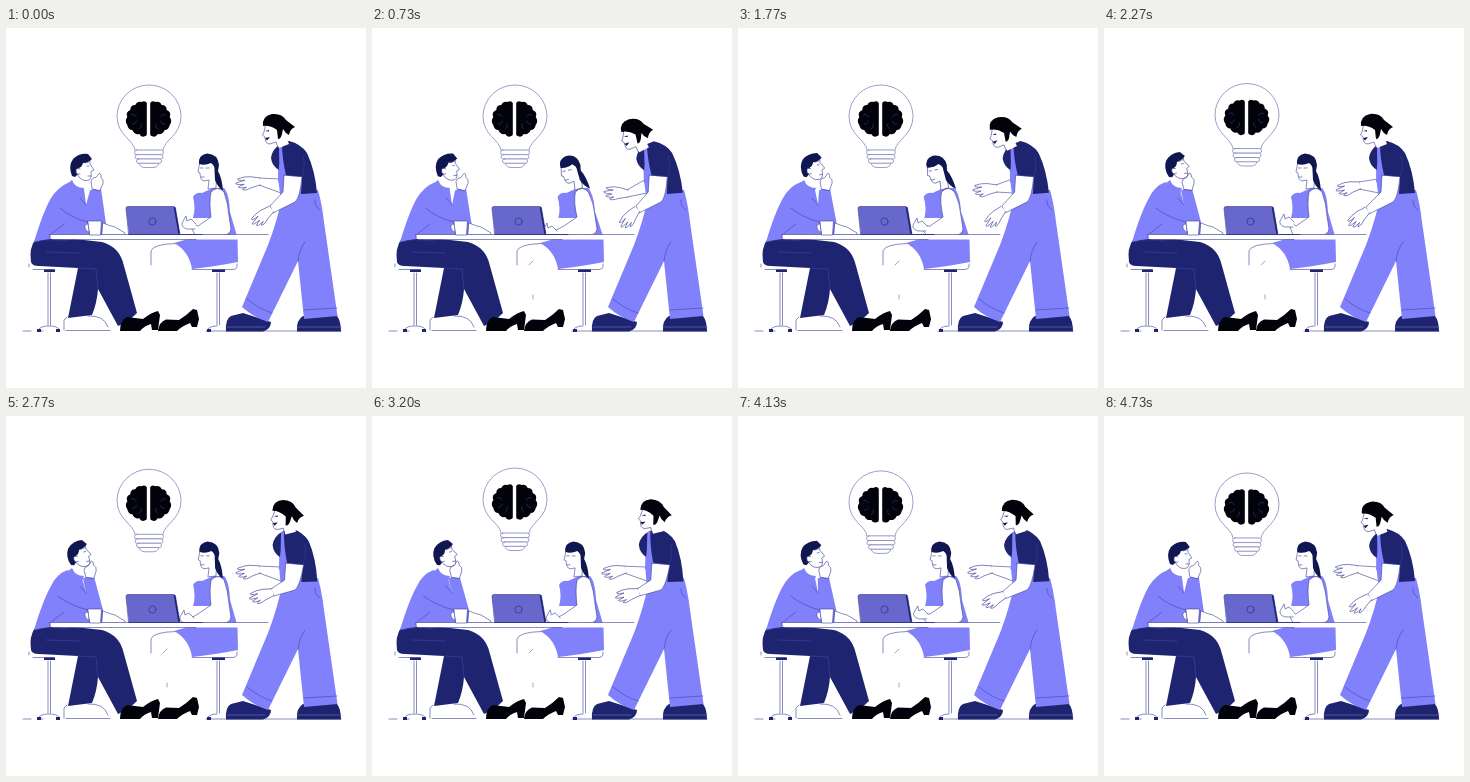
These frames come from a looping animation (360x360 px, 4800 ms). An HTML page:

```html
<!DOCTYPE html>
<html lang="en">
<head>
<meta charset="utf-8">
<title>Team brainstorm</title>
<style>
html, body { margin: 0; width: 100%; height: 100%; overflow: hidden; background: #fff; }
svg { display: block; width: 100vw; height: 100vh; }
path, circle, rect { stroke-linejoin: round; stroke-linecap: round; }
.line { fill: none; stroke: #3b3d92; stroke-width: .6; }
.skin { fill: #fff; stroke: #3b3d92; stroke-width: .6; }
.plain { fill: #fff; }
.glass { fill: #fff; stroke: #8587bd; stroke-width: .8; }
.violet { fill: #8181fb; }
.navy { fill: #1e246f; }
.hair { fill: #10164f; }
.black { fill: #02020a; }
.fold { fill: none; stroke: #4446b0; stroke-width: .6; }
</style>
</head>
<body>
<svg viewBox="0 0 360 360">
  <defs>
    <g id="half">
      <path class="black" d="M-1.5-16Q-3-19-7-17Q-11-18-13-14Q-18-14-18-9Q-23-7-21-2Q-24 2-21 6Q-20 11-16 11Q-14 16-9 15Q-7 19-3 17Q-1.500 17-1.500 15Z"/>
      <path class="line" d="M-17-4Q-14-6-12-2M-16 5Q-13 6-12 2M-9 10Q-6 8-7 5"/>
    </g>
    <path id="hand" class="skin" d="M1-4L-8-6Q-14-7-21-5Q-22-3-14-3L-23-1Q-25 1-15 1L-21 3Q-21 5-13 4L-17 6Q-15 8-8 5L1 3"/>
  </defs>

  <g id="bulb">
    <path class="glass" d="M129 122C128 112 111 107 111 88.500A32 31.500 0 0 1 175 88.500C175 107 158 112 157 122Z"/>
    <path class="glass" d="M133 135H153Q152 139.500 147 139.500H139Q134 139.500 133 135Z"/>
    <rect class="glass" x="128.500" y="122" width="29" height="4.600" rx="2.300"/>
    <rect class="glass" x="129" y="126.600" width="28" height="4.400" rx="2.200"/>
    <rect class="glass" x="130.500" y="131" width="25" height="4.200" rx="2.100"/>
    <use href="#half" x="142.300" y="91"/>
    <use href="#half" transform="translate(142.700 91) scale(-1 1)"/>
  </g>

  <path class="line" d="M17 303H25M32 303H37M200 303H335"/>
  <g id="stools">
    <path class="line" d="M23 236V239M27 241.500H48M42 245V297M44.500 245V297M33 301Q35 298 43 298T53 301"/>
    <path class="line" d="M231 236V239Q230 241.500 227 241.500H186M211 245V297M213.500 245V297M202 301Q204 298 211 298"/>
    <path class="navy" d="M38 241.500H49V244H38ZM206 241.500H219V244H206ZM31 301H35V304H31ZM50 301H54V304H50ZM201 301H205V304H201Z"/>
  </g>

  <!-- seated woman -->
  <path class="line" d="M145 237V223Q147 216 170 215.500"/>
  <path id="specks" class="line" d="M157 237L161 233M161 267V271"/>
  <path class="violet" d="M168 215L182 211H231.500L232 234Q206 239 186 241Q183 223 168 215Z"/>
  <g id="herTorso">
    <path class="plain" d="M201 149V160Q206 165 211 161V149Z"/>
    <path class="violet" d="M187 169Q190 164 196 165L207 160L218 160Q223 165 224 184L231 208H218L205 190H187Q190 180 187 169Z"/>
  </g>
  <g id="herHead">
    <path class="skin" d="M194 133Q193 139 192 144L194 145Q194 152 198 153L203 152L202 161L210 160L211 138L204 131Z"/>
    <path class="hair" d="M193 136Q192 127 201 125.500Q212 126 213 137L212 143Q216 150 217 163Q211 158 209 152L208.500 142Q209 138 205 135Q199 138 193 136Z"/>
    <path class="line" d="M194.500 140H197M200 140H203M195 149H198"/>
  </g>
  <path id="herArm" class="skin"/>
  <path id="herHand" class="skin" d="M8 5L0 5Q-6 3-5-1L-1-8L0-3L4-5L9 0"/>

  <!-- seated man -->
  <path class="line" d="M61 289L58 292V302M60 302.500H104M82 288Q98 287 102 299"/>
  <path class="navy" d="M29 212Q23 220 25 234Q26 238 33 238L72 240L62 290L86 287Q91 275 92 261L112 298Q122 294 131 285L118 238Q114 219 96 214L60 210Z"/>
  <path class="fold" d="M72 240L90 241L92 261M40 224L73 225"/>
  <path id="hisBody" class="violet"/>
  <g id="hisHead">
    <path class="plain" d="M67 146L66 156Q73 163 79 159L78 152Z"/>
    <path class="skin" d="M72 133L84 130L84 136L88 142L85 143.500Q86 150 83 152Q77 154 73 149L69 143Z"/>
    <path class="hair" d="M66 148Q62 138 67 131Q73 125 82 126L86 131Q82 135 77 135Q76 139 73 140V145L69 149Z"/>
    <path class="skin" d="M74 141Q70 139 70 143T74 146"/>
    <path class="line" d="M79 135L83 134M81 138H83M82 148H85"/>
  </g>
  <path class="violet" d="M61 156L66 152Q69 160 78 160L76 165Q66 164 61 156Z"/>
  <path id="hisArm" class="violet"/>
  <path id="hisHand" class="skin" d="M-5 7L-6 0Q-5-4-1-4L2-8Q4-9 4-4Q7-2 6 2L3 9Z"/>
  <path id="hisFold" class="fold"/>
  <path class="skin" d="M97 195Q104 198 109 199L119 205V207H96Z"/>

  <!-- table -->
  <path class="plain" d="M44 206.500H261Q262 211 255 211.500H47Q44 211 44 206.500Z"/>
  <path class="line" d="M44 206.500H262M46 211.500H190M44 206.500V210"/>
  <path class="line" d="M31 214Q38 210 62 213"/>
  <path class="skin" d="M82 193H95.500L94.500 207H84ZM82 196Q78 196 79 200T83 204"/>
  <path d="M120 180Q120 178.500 122 178.500H167Q169 178.500 169.500 180L174 206.500H123Z" fill="#6868cc" stroke="#34368f" stroke-width=".6"/>
  <path d="M168.500 179.500L173 205.500" stroke="#1e246f" stroke-width="1.500"/>
  <circle cx="146.500" cy="193.500" r="3.600" fill="none" stroke="#34368f" stroke-width=".8"/>
  <path d="M123 206.500H196" stroke="#34368f"/>

  <!-- heeled shoes -->
  <path class="black" d="M114 303Q114 292 121 289L137 291Q146 284 152 283L154 287L152 302H146L145 296Q138 298 134 303Z"/>
  <path class="black" d="M152 303Q153 294 160 291.500L173 292Q181 287 187 281L191 282L193 291L191 299H186L184 295Q176 298 171 303Z"/>

  <!-- presenter -->
  <path id="farArm" class="skin"/>
  <use id="farHand" href="#hand"/>
  <path class="navy" d="M220 303.500Q219 291 225 288L237 285L265 294Q265 301 257 303.500ZM291 303.500Q290 292 297 288H331Q335 293 335 303.500Z"/>
  <path d="M221 299H259M291 299H335" stroke="#7f84c4" stroke-width=".5"/>
  <path class="violet" d="M278 162H312Q316 176 318 194L331.500 288L298 291L292 233L262 294Q247 289 236 279L262 217Q271 194 278 162Z"/>
  <path class="fold" d="M241 271Q253 281 266 285M298 282L331 280M292 233Q293 222 299 214M309 171Q308 178 314 182"/>
  <g id="torso">
    <path class="plain" d="M271 108L275 122L284 120L282 108Z"/>
    <path class="violet" d="M272 138L296 150L311 163L313 171L276 176Q272 158 272 138Z"/>
    <path class="navy" d="M275 116L283 113Q295 116 301 125Q309 142 311 165L295 166L296 149L278 147L273 142Q266 138 265 130Q266 121 275 116Z"/>
    <path class="violet" d="M273 117L276 116Q276 130 280 147L276 156L272 154Q274 135 273 117Z"/>
    <path class="line" d="M297 128Q300 138 296 149"/>
  </g>
  <path id="nearArm" class="skin"/>
  <use id="nearHand" href="#hand"/>
  <g id="head">
    <path class="plain" d="M260 94L258 104L256.500 108L259 109Q259 116 264 116L270 114L273 120L283 116L278 104L276 94Z"/>
    <path class="line" d="M260 95L258 104L256.500 107L259 109Q259 116 264 116L270 114L272 120"/>
    <path class="black" d="M257 98Q256 88 266 86Q276 85 280 92L289 99Q284 101 283 107Q279 105 277 101L276 106Q275 111 272 111L271 102Q264 97 257 98Z"/>
    <path class="hair" d="M259 103L263 102L263 103.500ZM259 110L264 109L261 112.500Z"/>
  </g>
</svg>

<script>
const LOOP = 4800;
const $ = id => document.getElementById(id);
const set = (id, name, value) => $(id).setAttribute(name, value);
const move = (id, value) => set(id, 'transform', value);
const times = [0, 730, 1770, 2270, 2770, 3670];
const N = times.length;

const knot = i => times[(i + N) % N] + LOOP * Math.floor(i / N);

// Smooth looping curve through one value per listed time.
function pose(t, ...v) {
  const at = i => v[(i + N) % N];
  const slope = i => (at(i + 1) - at(i - 1)) / (knot(i + 1) - knot(i - 1));
  let i = 0;
  while (i < N - 1 && t >= times[i + 1]) i++;
  const h = knot(i + 1) - knot(i), k = (t - knot(i)) / h;
  const e = k * k * (3 - 2 * k);
  return at(i) + (at(i + 1) - at(i)) * e
    + h * k * (1 - k) * (slope(i) * (1 - k) - slope(i + 1) * k);
}

function ease(t, from, to) {
  const k = Math.min(1, Math.max(0, (t - from) / (to - from)));
  return k * k * (3 - 2 * k);
}

function place(id, x, y, turn, px = 0, py = 0) {
  move(id, `translate(${x} ${y}) rotate(${turn} ${px} ${py})`);
}

function drawMan(t) {
  const tilt = pose(t, 0, -2, -6, -12.5, -12.5, -11);
  const hx = pose(t, 91, 90, 88, 84, 84, 84);
  const hy = 153.5;
  const lean = tilt / 5;
  move('hisHead', `rotate(${tilt} 70 153)`);
  set('hisBody', 'd', `M${64 + lean} 154Q${53 + lean} 158 45 170Q37 184 28 214Q50 208 82 208H98L80 176L${78 + lean} 161Q70 162 ${64 + lean} 154Z`);
  set('hisArm', 'd', `M${hx - 7} ${hy + 9}L80 177L82 194L97 206Q101 202 ${100 + lean} 196L${hx + 4} ${hy + 7}Q${hx - 2} ${hy + 6} ${hx - 7} ${hy + 9}Z`);
  set('hisFold', 'd', `M80 177L74 170M${54 + lean} 180Q65 190 82 194M44 207L58 196`);
  place('hisHand', hx, hy, tilt / 2);
}

function drawSeated(t) {
  const turn = pose(t, 0, -13, -12, 0, 1, 0);
  const x = pose(t, 181, 176, 180, 181, 179, 180);
  const y = pose(t, 196, 203, 198, 194, 202, 200);
  const s = turn / 8;
  move('herHead', `rotate(${turn} 208 157)`);
  move('herTorso', `translate(0 207) skewX(${-turn / 6}) translate(0 -207)`);
  set('herArm', 'd', `M${x + 6} ${y}L192 198L205 189Q${203 + s} 174 ${205 + s} 164Q${212 + s} 157 ${218 + s} 164Q222 175 223 188L225 201Q224 207 217 207H189L${x + 5} ${y + 5}Z`);
  place('herHand', x, y, 0);
}

function drawPresenter(t) {
  const lean = pose(t, 0, -1, -.5, 0, 2, 2);
  const fx = pose(t, 253, 255, 258, 255, 253, 253);
  const fy = pose(t, 154, 166, 161, 158, 154, 155);
  const nx = pose(t, 265, 265, 265, 263, 266, 266);
  const ny = pose(t, 182, 182, 182, 183, 177, 178);
  const s = lean * .8;
  move('torso', `rotate(${lean} 296 175)`);
  place('farHand', fx, fy, pose(t, -5, 4, -4, -12, -9, -9));
  set('farArm', 'd', `M274 151L${fx} ${fy - 4}V${fy + 3}L275 165Z`);
  place('nearHand', nx, ny, pose(t, -38, -48, -45, -40, -15, -17));
  set('nearArm', 'd', `M${278 + s} 147.500L${277 + s} 164L${nx - 1} ${ny - 4}L${nx + 2} ${ny + 3}L289 174Q294 170 ${296 + s} 149Z`);
  place('head', pose(t, 0, -6, -4, 0, 7, 8), pose(t, 0, 4, 2.5, 0, -1, -2),
    pose(t, 0, -6, -4, 0, 7, 7), 276, 116);
}

function draw(t) {
  move('bulb', `translate(0 ${5 * (ease(t, 3300, LOOP) - ease(t, 1700, 3300))})`);
  set('specks', 'opacity', t > 500 && t < 4500 ? .8 : 0);
  drawMan(t);
  drawSeated(t);
  drawPresenter(t);
}

function tick() {
  draw(performance.now() % LOOP);
  requestAnimationFrame(tick);
}
tick();
</script>
</body>
</html>
```
